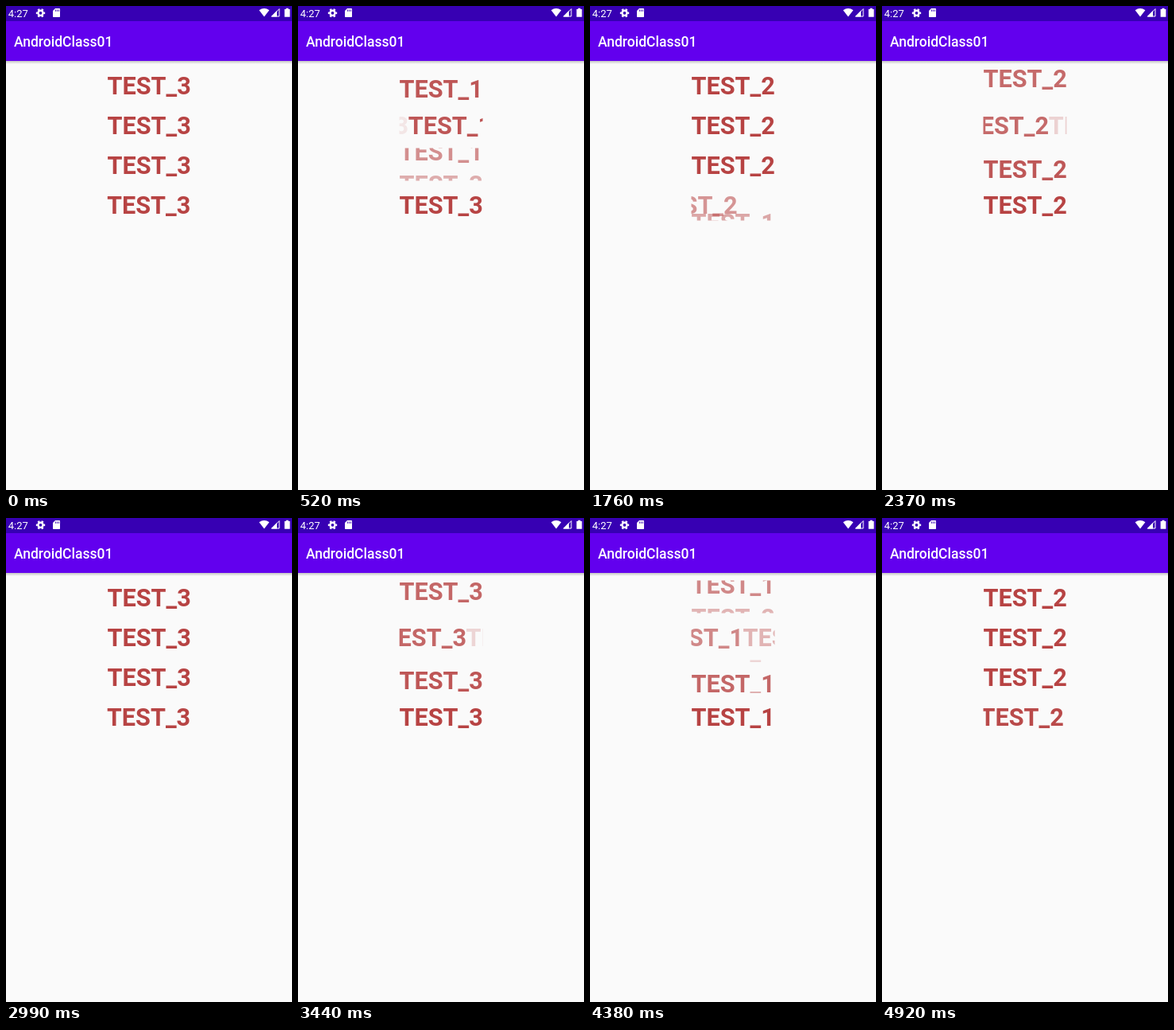
An HTML page that plays this animation: 360 px wide and 608 px high, repeating every 5000 ms.

```html
<!DOCTYPE html>
<html lang="en">
<head>
<meta charset="utf-8">
<title>Text switchers</title>
<style>
  html, body { margin: 0; width: 100%; height: 100%; overflow: hidden; background: #fafafa; }
  #stage { display: block; width: 360px; height: 608px; font-family: Roboto, sans-serif; }
  .label { font-size: 30.7px; font-weight: 700; fill: #b74343; }
</style>
</head>
<body>
<svg id="stage" viewBox="0 0 360 608">
  <defs>
    <linearGradient id="shade" x2="0" y2="1">
      <stop offset="0" stop-opacity=".22"/>
      <stop offset="1" stop-opacity="0"/>
    </linearGradient>
  </defs>
  <rect width="360" height="608" fill="#fafafa"/>
  <rect y="69" width="360" height="4" fill="url(#shade)"/>
  <rect width="360" height="69" fill="#6200ee"/>
  <rect width="360" height="19" fill="#3700b3"/>
  <g fill="#fff">
    <text x="2.7" y="13.6" font-size="13">4:27</text>
    <text x="10" y="51" font-size="17.5" font-weight="500">AndroidClass01</text>
    <!-- settings -->
    <g fill="none" stroke="#fff">
      <circle cx="43.5" cy="8.8" r="3.1" stroke-width="2.4"/>
      <circle cx="43.5" cy="8.8" r="4.8" stroke-width="1.8" pathLength="12" stroke-dasharray="1" stroke-dashoffset=".5"/>
    </g>
    <!-- memory card -->
    <path d="M62 3h5.2q.8 0 .8.8v9.4q0 .8-.8.8h-7.4q-.8 0-.8-.8V6z"/>
    <path d="M62.4 4.5v2.4M64.4 4.5v2.4M66.4 4.5v2.4" stroke="#3700b3" stroke-width=".9"/>
    <!-- wifi, signal, battery -->
    <path d="M318.6 5.2q6.4-4.6 12.8 0L325 13.5z"/>
    <path d="M333.5 13.5L341 6v7.5z"/>
    <path d="M334.6 13L344 3.6V13z" fill="none" stroke="#fff"/>
    <path d="M352.5 2.8h3v1.2h1.9v9.8h-6.8V4h1.9z"/>
  </g>
  <g id="rows"></g>
</svg>
<script>
const LOOP = 5000, STEP = 77, LEAD = 23;
const WIDTH = 105, HEIGHT = 40.8;
const starts = [-750, 240, 1232, 2256, 3262, 4218];

// Directions are in box sizes: where the new label comes from, where the old one goes
const rows = [
  { from: [0, 1], to: [0, -1], duration: 350, delay: 0 },
  { from: [1, 0], to: [-1, 0], duration: 350, delay: 0 },
  { from: [0, -1], to: [0, 1], duration: 500, delay: 0 },
  { from: [-1, 0], to: [0, 1], duration: 500, delay: 250 },
];

function add(parent, tag, attributes) {
  const node = document.createElementNS('http://www.w3.org/2000/svg', tag);
  for (const key in attributes) node.setAttribute(key, attributes[key]);
  return parent.appendChild(node);
}

rows.forEach((row, i) => {
  const box = add(document.getElementById('rows'), 'svg',
    { x: 127.5, y: 78.6 + 50 * i, width: WIDTH, height: HEIGHT, overflow: 'hidden' });
  row.older = add(box, 'text', { class: 'label', y: 32.4 });
  row.newer = add(box, 'text', { class: 'label', y: 32.4 });
});

const ease = x => (1 - Math.cos(Math.PI * Math.min(1, Math.max(0, x)))) / 2;

function place(label, number, [dx, dy], away) {
  label.textContent = 'TEST_' + number;
  label.setAttribute('transform', `translate(${dx * away * WIDTH} ${dy * away * HEIGHT})`);
  label.setAttribute('opacity', 1 - away);
}

function draw() {
  const now = performance.now() % LOOP;
  const time = Math.floor((now + LEAD) / STEP) * STEP - LEAD;
  const turn = starts.filter(start => start <= time).length - 1;
  for (const row of rows) {
    const progress = ease((time - starts[turn] - row.delay) / row.duration);
    place(row.older, (turn + 1) % 3 + 1, row.to, progress);
    place(row.newer, (turn + 2) % 3 + 1, row.from, 1 - progress);
  }
  requestAnimationFrame(draw);
}
draw();
</script>
</body>
</html>
```
